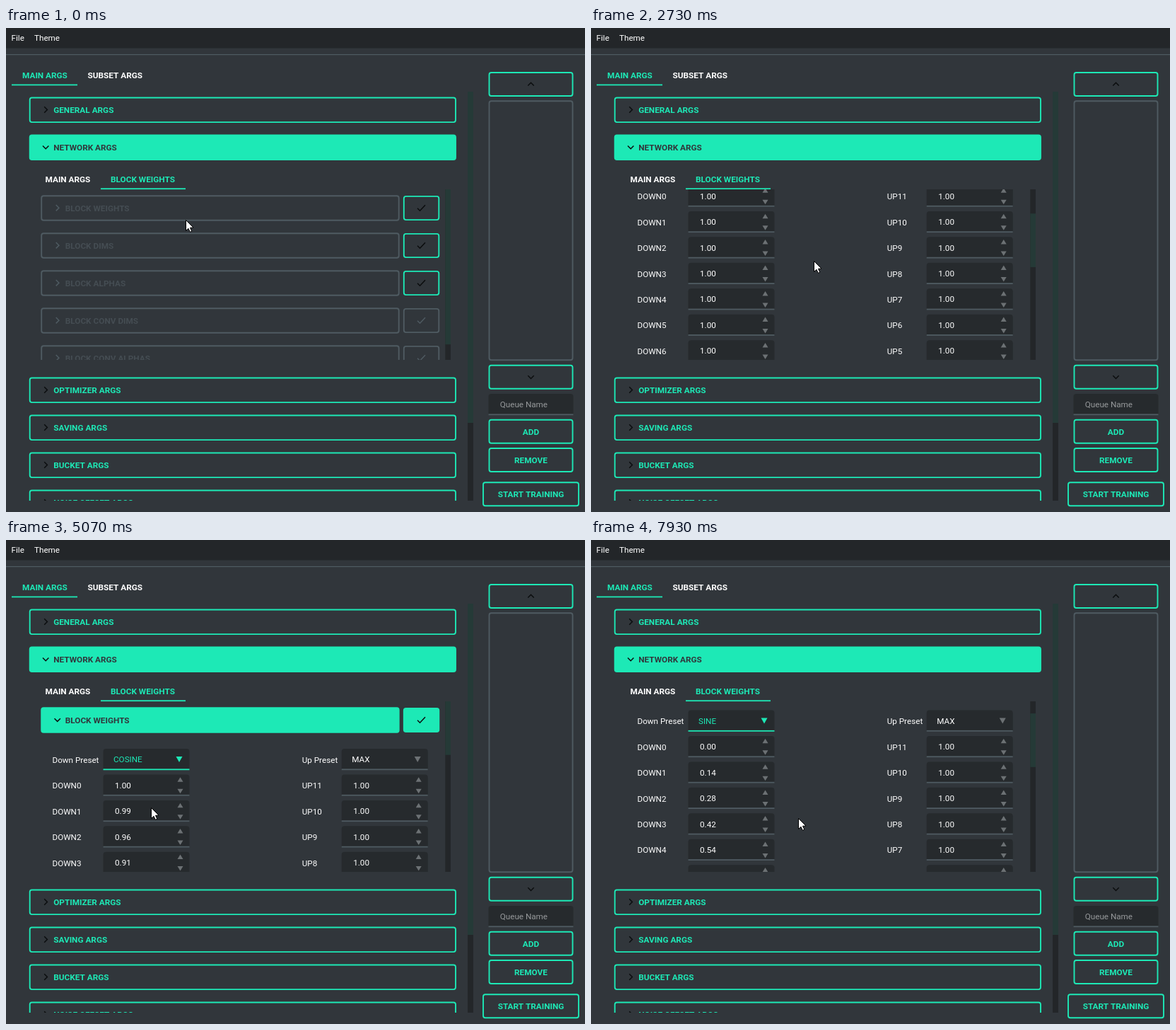
Recreate the animation shown at these times as an HTML page with a canvas. Size 819x684 px, loop 8000 ms.

```html
<!DOCTYPE html>
<html lang="en">
<head>
<meta charset="utf-8">
<title>Training settings</title>
<style>
html, body { margin: 0; width: 100%; height: 100%; overflow: hidden; background: #31363b; }
canvas { display: block; }
</style>
</head>
<body>
<canvas id="stage" width="819" height="684"></canvas>
<script>
const ctx = document.getElementById('stage').getContext('2d');
const TEAL = '#1de9b6', BG = '#31363b', DARK = '#232629', FIELD = '#262a2d';
const GREY = '#4f5b62', DIM = '#454d53', HANDLE = '#253a37', ARROW = '#6c7174';
const LOOP = 8000, STEP = 54.5, ROW = 36.45;
const LIST = { top: 228, height: 241 };
const BLOCKS = ['WEIGHTS', 'DIMS', 'ALPHAS', 'CONV DIMS', 'CONV ALPHAS'];
const PRESETS = ['MAX', 'COSINE', 'SINE', 'LINEAR', 'REV_LINEAR', 'ZEROS'];
const CURVES = [() => 1, a => Math.cos(a), a => Math.sin(a)];

// Timelines: [ms, value], held until the next entry
const SCROLL = [[0, 0], [2200, 1], [2270, 2], [2800, 3], [2870, 4], [2930, 6], [3200, 5], [3270, 4],
  [3400, 3], [3470, 2], [3530, 1], [3730, 0], [6870, 1], [6930, 2], [7070, 3], [7130, 4],
  [7200, 6], [7270, 7], [7730, 5], [7800, 4], [7870, 2], [7930, 1]];
const POPUP = [[0, 0], [4400, .35], [4470, .85], [4530, 1], [5070, 0], [5870, .5], [5930, .9], [6000, 1], [6670, 0]];
const HIGHLIGHT = [[0, 0], [4800, 1], [6270, 2]];
const PRESET = [[0, 0], [5070, 1], [6670, 2]];
// Pointer path: [ms, x, y], moved linearly
const POINTER = [[0, 254, 271], [250, 236, 300], [450, 400, 424], [620, 628, 330], [800, 590, 256],
  [1000, 590, 256], [1270, 447, 279], [1600, 300, 260], [2400, 300, 260], [2730, 315, 329],
  [3730, 315, 329], [4200, 225, 309], [4600, 225, 309], [4870, 205, 378], [5270, 205, 378],
  [5730, 205, 310], [6000, 205, 310], [6130, 194, 380], [6270, 190, 412], [6600, 190, 412],
  [7000, 291, 387], [7270, 293, 393], [8000, 293, 393]];

const held = (keys, now) => keys.findLast(k => k[0] <= now)[1];

function pointerAt(now) {
  const i = POINTER.findIndex(k => k[0] > now);
  const [t0, x0, y0] = POINTER[i - 1], [t1, x1, y1] = POINTER[i];
  const p = (now - t0) / (t1 - t0);
  return { x: x0 + (x1 - x0) * p, y: y0 + (y1 - y0) * p };
}

function rect(x, y, w, h, color) {
  ctx.fillStyle = color;
  ctx.fillRect(x, y, w, h);
}

function text(s, x, y, color, bold = false, align = 'left') {
  ctx.font = bold ? 'bold 11.8px Roboto, sans-serif' : '11.7px Roboto, sans-serif';
  ctx.textAlign = align;
  ctx.fillStyle = color;
  ctx.fillText(s, x, y + 4.2);
}

function line(x, y, points, color, width = 1.5) {
  ctx.beginPath();
  points.forEach(([dx, dy]) => ctx.lineTo(x + dx, y + dy));
  ctx.strokeStyle = color;
  ctx.lineWidth = width;
  ctx.stroke();
}

const chevronRight = (x, y, color) => line(x, y, [[-2, -4.2], [2.2, 0], [-2, 4.2]], color);
const chevronDown = (x, y, color) => line(x, y, [[-4.2, -2], [0, 2.2], [4.2, -2]], color);
const chevronUp = (x, y, color) => line(x, y, [[-4.2, 2], [0, -2.2], [4.2, 2]], color);
const check = (x, y, color) => line(x, y, [[-5.5, .5], [-2, 4], [5.5, -4]], color);

function triangle(x, y, w, h, color) {
  ctx.beginPath();
  ctx.moveTo(x - w / 2, y - h / 2);
  ctx.lineTo(x + w / 2, y - h / 2);
  ctx.lineTo(x, y + h / 2);
  ctx.fillStyle = color;
  ctx.fill();
}

// Outlined button, centred on y, with an optional teal fill of given opacity
function box(x, y, w, h, border, fill = 0) {
  ctx.beginPath();
  ctx.roundRect(x + 1, y - h / 2 + 1, w - 2, h - 2, 3);
  if (fill) {
    ctx.globalAlpha = fill;
    ctx.fillStyle = TEAL;
    ctx.fill();
  }
  ctx.strokeStyle = border;
  ctx.lineWidth = 1.9;
  ctx.stroke();
  ctx.globalAlpha = 1;
}

function header(label, x, y, w, { open = false, enabled = true, fill = 0 } = {}) {
  box(x, y, w, 36.6, enabled ? TEAL : GREY, fill);
  (open ? chevronDown : chevronRight)(x + 23.5, y - .3, enabled ? '#0b0d0e' : GREY);
  text(label, x + 34.5, y, !enabled ? DIM : fill > .5 ? BG : TEAL, true);
}

function button(label, x, y, w) {
  box(x, y, w, 35, TEAL);
  if (label) text(label, x + w / 2, y, TEAL, true, 'center');
}

function field(x, y, w, underline = GREY) {
  ctx.beginPath();
  ctx.roundRect(x, y - 15, w, 30, [4, 4, 0, 0]);
  ctx.fillStyle = FIELD;
  ctx.fill();
  rect(x, y + 13.4, w, 1.8, underline);
}

function combo(label, value, x, y, active) {
  text(label, x - 72 + (x > 400 ? 16 : 0), y + .5, '#fff');
  field(x, y, 122, active ? TEAL : GREY);
  text(value, x + 14.5, y, active ? TEAL : '#fff');
  triangle(x + 107.5, y, 9, 8, active ? TEAL : ARROW);
}

function spin(label, value, x, y) {
  text(label, x - 72 + (x > 400 ? 16 : 0), y + .5, '#fff');
  field(x, y, 122);
  text(value.toFixed(2), x + 16.5, y, '#fff');
  triangle(x + 109, y - 8, 8, -6.5, ARROW);
  triangle(x + 109, y + 8.5, 8, 6.5, ARROW);
}

function drawWindow() {
  rect(0, 0, 819, 684, BG);
  rect(0, 0, 819, 28.5, DARK);
  rect(0, 37, 819, 1.2, GREY);
  text('File', 7.5, 14, '#fff');
  text('Theme', 40, 14, '#fff');
  text('MAIN ARGS', 23, 67, TEAL, true);
  text('SUBSET ARGS', 115.5, 67, '#fff', true);
  rect(8, 79.5, 93, 1.8, TEAL);

  rect(653, 90, 8, 578, DARK);
  rect(653, 90, 8, 468, HANDLE);
  ctx.save();
  ctx.beginPath();
  ctx.rect(0, 90, 660, 578);
  ctx.clip();
  header('GENERAL ARGS', 32.7, 115.8, 604.3);
  header('NETWORK ARGS', 32.7, 168.8, 604.3, { open: true, fill: 1 });
  ['OPTIMIZER', 'SAVING', 'BUCKET', 'NOISE OFFSET'].forEach((name, i) =>
    header(name + ' ARGS', 32.7, 511.8 + 53 * i, 604.3));
  ctx.restore();

  text('MAIN ARGS', 55.5, 214, '#fff', true);
  text('BLOCK WEIGHTS', 148, 214, TEAL, true);
  rect(134, 226.3, 120, 1.8, TEAL);

  button('', 682.5, 79.5, 120);
  chevronUp(742.5, 79.5, '#0b0d0e');
  box(682.5, 286.3, 120, 368, GREY);
  button('', 682.5, 493.3, 120);
  chevronDown(742.5, 493.3, '#0b0d0e');
  field(682.5, 532, 120);
  text('Queue Name', 698.7, 531.5, '#96999b');
  button('ADD', 682.5, 570.3, 120);
  button('REMOVE', 682.5, 610.5, 120);
  button('START TRAINING', 674, 658.7, 137);
}

function drawList(now, pointer) {
  const offset = held(SCROLL, now) * STEP;
  const enabled = now >= 1070, filled = now >= 1670, open = now >= 1870;
  const preset = held(PRESET, now);
  const over = (x, y, w, h) => pointer.x >= x && pointer.x < x + w && Math.abs(pointer.y - y) < h / 2;
  const shade = (on, hover) => on ? (hover ? .8 : 1) : hover ? .2 : 0;

  ctx.save();
  ctx.beginPath();
  ctx.rect(40, LIST.top, 600, LIST.height);
  ctx.clip();

  BLOCKS.forEach((name, i) => {
    const y = 254.5 + 53 * i - offset + (open && i ? 504 : 0);
    const first = i === 0, active = first && enabled, usable = i < 3;
    header('BLOCK ' + name, 49.2, y, 507.5, {
      open: first && open, enabled: active,
      fill: active ? shade(filled, over(49, y, 507, 36)) : 0
    });
    const lingering = first && enabled && now < 1330;
    const hover = usable && over(562, y, 51, 34) || lingering;
    box(561.8, y, 51.5, 35.2, usable ? TEAL : GREY, shade(active, hover));
    check(587.5, y - .3, usable ? '#0b0d0e' : GREY);
  });

  if (open) {
    const top = 310 - offset;
    combo('Down Preset', PRESETS[preset], 137.5, top, now >= 4330 || over(138, top, 122, 30));
    combo('Up Preset', PRESETS[0], 474.7, top, false);
    for (let i = 0; i < 12; i++) {
      const y = top + ROW * (i + 1);
      spin('DOWN' + i, CURVES[preset](Math.PI / 2 * i / 11), 137.5, y);
      spin('UP' + (11 - i), 1, 474.7, y);
    }
  }

  const content = open ? 767 : 265;
  rect(621.3, LIST.top, 7.7, LIST.height, DARK);
  rect(621.3, LIST.top + offset * LIST.height / content, 7.7, LIST.height ** 2 / content, HANDLE);
  ctx.restore();
}

// The preset list slides out from under its field
function drawPopup(now) {
  const full = 229.5, top = 325, left = 138, width = 121;
  const shown = held(POPUP, now) * full;
  if (!shown) return;
  const shift = shown - full;
  ctx.save();
  ctx.beginPath();
  ctx.rect(left, top, width, shown + 1);
  ctx.clip();
  rect(left, top, width, shown + 1, GREY);
  rect(left + 1.5, top, width - 3, shown - 1, DARK);
  PRESETS.forEach((name, i) => {
    const y = 348.7 + ROW * i + shift;
    if (i === held(HIGHLIGHT, now)) rect(143, y - ROW / 2, 111, ROW, '#224d45');
    text(name, 149.5, y, '#fff');
  });
  ctx.restore();
}

function drawPointer({ x, y }) {
  ctx.beginPath();
  [[.5, .5], [.5, 15.5], [4, 12.3], [6.3, 17.3], [8.8, 16.2], [6.5, 11.3], [11, 11]]
    .forEach(([dx, dy]) => ctx.lineTo(x + dx, y + dy));
  ctx.closePath();
  ctx.fillStyle = '#fff';
  ctx.fill();
  ctx.strokeStyle = '#000';
  ctx.lineWidth = 1;
  ctx.stroke();
}

function draw() {
  const tick = Math.floor((performance.now() % LOOP + 4) * 15 / 1000) % 120;
  const now = Math.round(tick * 20 / 3) * 10;
  const pointer = pointerAt(now);
  drawWindow();
  drawList(now, pointer);
  drawPopup(now);
  drawPointer(pointer);
  requestAnimationFrame(draw);
}
draw();
</script>
</body>
</html>
```
